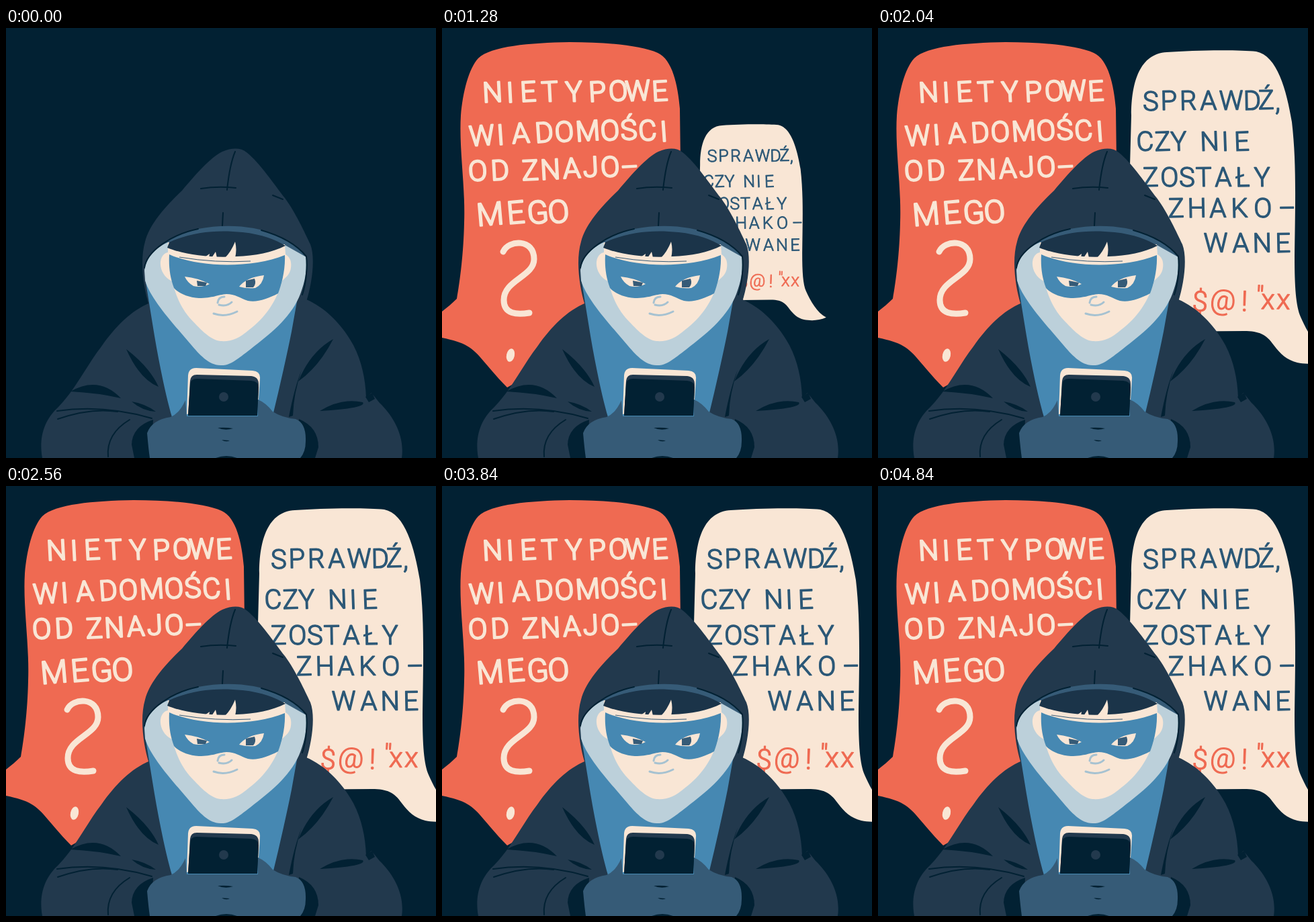
An HTML page for the animation above (4.88 s loop, 640 by 640 pixels).

```html
<!DOCTYPE html>
<html lang="pl">
<head>
<meta charset="utf-8">
<title>Nietypowe wiadomości</title>
<style>
  html, body { margin: 0; height: 100%; overflow: hidden; background: #022133; }
  svg { display: block; width: 100vw; height: 100vh; }
  text { font-family: Roboto, "Open Sans", sans-serif; font-weight: 300; font-stretch: 85%; text-anchor: middle; stroke-linejoin: round; white-space: pre; }
  .cream { fill: #f9e6d5; }
  .red { fill: #ef6a52; }
  .night { fill: #022133; }
  .jacket { fill: #22394d; }
  .steel { fill: #365b77; }
  .blue { fill: #4688b2; }
  .pale { fill: #bcd0da; }
  .line { fill: none; stroke: #022133; stroke-width: 2; stroke-linecap: round; stroke-linejoin: round; }
  .soft { fill: none; stroke: #a6c2d1; stroke-width: 3; stroke-linecap: round; }
  .ask text { fill: #f9e6d5; stroke: #f9e6d5; stroke-width: 2.4; font-size: 42px; }
  .tip text { fill: #2c5877; stroke: #2c5877; stroke-width: 1.5; font-size: 40px; }
  .tip .curse { fill: #ef6a52; stroke: #ef6a52; stroke-width: 1.2; font-size: 42px; }
</style>
</head>
<body>
<svg viewBox="0 0 640 640">
  <rect class="night" width="640" height="640"/>

  <g id="ask" class="ask">
    <path class="red" d="M28 130C31 95 40 60 54 45C73 27 130 22 190 21C245 21 296 26 321 37C343 47 351 85 354 120L355 200L340 400L250 450L97 535C85 523 74 510 62 496C45 475 34 468 0 461L-25 446C-14 431 6 419 22 403C27 375 32 335 33 290C35 235 25 180 28 130Z"/>
    <text x="76 102 129 161 197 232 263 292 325" y="111 111 110 110 110 110 109 109 109" rotate="-3">NIETYPOWE</text>
    <text x="60 88 118 153 183 218 251 279 307 331" y="176 174 172 171 170 169 168 167 168 169" rotate="-4">WIADOMOŚCI</text>
    <text x="54 87 110 132 162 194 222 251 280" y="228 227 227 227 226 224 222 222 222" rotate="-3">OD ZNAJO–</text>
    <text x="73 111 144 175" y="295 292 292 291" rotate="-5" style="font-size:47px">MEGO</text>
    <path d="M91 333C99 315 137 313 137 344C137 370 92 375 92 405C92 426 111 427 130 424" fill="none" stroke="#f9e6d5" stroke-width="9" stroke-linecap="round"/>
    <ellipse class="cream" cx="102" cy="487" rx="6" ry="10" transform="rotate(12 102 487)"/>
  </g>

  <g id="tip" class="tip">
    <path class="cream" d="M377 130C377 80 390 38 430 36C470 33 535 32 563 35C594 41 608 92 616 140C623 200 621 260 620 340C620 385 622 414 629 430C639 453 656 482 677 493C660 501 640 501 624 498C608 494 599 485 589 472C578 456 567 451 545 451L440 452L385 390L375 205Z"/>
    <text x="406 433 462 492 526 557 578 595" y="123 122 122 122 122 122 121 123" rotate="-1">SPRAWDŹ,</text>
    <text x="398 424 448 468 494 517 542" y="183" rotate="-2">CZY NIE</text>
    <text x="406 434 460 485 514 543 572" y="236" rotate="-1">ZOSTAŁY</text>
    <text x="444 475 506 538 573 609" y="282" rotate="-1">ZHAKO–</text>
    <text x="503 540 572 603" y="334" rotate="-1">WANE</text>
    <text class="curse" x="479 513 545 568 580 603" y="421 418 421 414 418 418" rotate="2">$@!"xx</text>
  </g>

  <g id="figure">
    <path class="jacket" d="M54 640C49 612 55 585 78 564C104 537 119 504 142 474C163 444 186 421 214 409L447 404C479 418 503 446 517 472C530 497 535 524 536 550L544 543L556 558C575 576 594 606 589 640Z"/>
    <path class="jacket" d="M213 413C204 385 199 345 207 318C214 290 242 261 262 242C283 217 304 193 322 184C337 178 349 178 358 185C379 202 399 233 415 253C430 273 445 305 453 322C461 343 455 382 447 407Z"/>

    <path class="blue" d="M207 372L218 440C226 490 237 545 247 579L396 581C406 540 417 492 425 452L435 396Z"/>
    <path class="steel" d="M206 354C211 329 247 307 286 299C326 291 371 294 402 308C425 318 438 328 447 341L445 370L208 372Z"/>
    <path class="pale" d="M206 361C209 341 222 327 241 319L415 323L447 341C449 360 444 382 436 401C421 434 392 456 364 478C343 494 333 503 319 502C302 502 287 485 276 472C249 440 216 405 207 376Z"/>
    <path class="cream" d="M241 319L415 322L416 337C424 342 425 349 424 357C423 366 416 372 411 376C403 407 385 432 362 449C346 463 335 467 319 466C304 465 286 445 273 431C258 413 253 397 247 377C235 371 229 359 230 348C231 339 236 335 241 334Z"/>
    <path fill="#1b3449" d="M243 319C277 303 315 300 352 304C381 307 401 315 416 324C397 334 370 339 343 340C306 343 264 337 240 327Z"/>
    <path class="cream" d="M326 342Q335 333 341 318Q344 330 341 342ZM306 342L312 333L314 342ZM296 341L303 336L302 342Z"/>
    <path d="M258 341Q312 350 364 347" fill="none" stroke="#365b77"/>
    <path class="blue" d="M243 337C287 357 365 358 415 338C416 360 410 382 405 395C390 403 373 409 360 406C348 402 341 396 328 396C315 397 308 402 287 402C270 401 256 394 250 387C244 371 242 355 243 337Z"/>
    <path class="cream" d="M266 370Q286 372 303 381Q291 387 279 384Q270 379 266 370ZM347 385Q358 371 384 368Q382 382 371 387Q357 388 347 385Z"/>
    <path class="steel" d="M284 376L299 379L297 384L285 384ZM357 376L370 373Q373 381 368 386L357 386Z"/>
    <path class="soft" d="M315 409Q316 400 325 400M317 412Q329 415 336 408M309 425Q326 431 344 422"/>

    <path class="line" d="M206 357C209 332 247 307 286 299M380 301Q426 314 447 340C449 359 446 382 441 397"/>
    <path class="line" d="M341 184Q333 203 329 241M290 239Q316 235 342 238M323 275L322 294M397 249L412 255"/>
    <path class="night" d="M179 478Q214 505 227 534Q199 523 179 478ZM96 541Q138 517 171 551Q136 543 96 541ZM187 556Q207 559 223 571Q203 570 187 556ZM487 463Q453 482 435 526Q466 504 487 463ZM440 509Q429 536 421 579L427 577Q428 544 440 509ZM467 570Q500 550 531 557Q538 566 467 570ZM535 549L545 543L549 552L540 557Z"/>
    <path class="line" d="M76 570Q146 560 217 581M77 582Q126 565 166 571M152 638Q149 604 184 583"/>

    <path class="night" d="M219 583Q188 593 187 620L191 640H216ZM436 582Q465 594 465 624L460 640H430Z"/>
    <path class="steel" d="M267 554Q258 574 245 579Q217 583 210 603Q212 626 214 640H438Q446 631 446 615Q447 588 431 582Q411 580 397 571Q387 558 375 553V578H269Z"/>
    <path class="cream" d="M269 575L271 517Q272 506 283 506L367 510Q379 511 378 522L376 553L285 570Z"/>
    <path class="jacket" d="M271 577L274 525Q275 516 284 516L365 518Q376 519 376 530L374 577Z"/>
    <path class="night" d="M271 577L274 530Q275 522 284 522L365 525Q376 526 376 535L374 577Z"/>
    <circle class="jacket" cx="324" cy="549" r="7"/>
    <path class="night" d="M315 595Q327 594 338 596Q326 600 315 595ZM321 613L333 614Q327 617 321 613ZM312 640Q328 634 344 640Z"/>
  </g>
</svg>
<script>
  const LOOP = 4880, STEP = 40, POP = 437;
  const bubbles = [
    { id: "ask", start: 29, x: 237, y: 290 },
    { id: "tip", start: 1206, x: 396, y: 327 }
  ].map(b => ({ ...b, node: document.getElementById(b.id) }));

  // Grows past full size, then settles back.
  function backOut(p) {
    if (p <= 0) return 0;
    if (p >= 1) return 1;
    const u = p - 1;
    return 1 + 2.70158 * u ** 3 + 1.70158 * u ** 2;
  }

  function draw(now) {
    const t = Math.floor((now % LOOP) / STEP) * STEP;
    for (const { node, start, x, y } of bubbles) {
      const s = backOut((t - start) / POP);
      node.style.display = s > 0 ? "" : "none";
      node.setAttribute("transform", `translate(${x} ${y}) scale(${s}) translate(${-x} ${-y})`);
    }
  }

  const begin = performance.now();
  function tick() {
    draw(performance.now() - begin);
    requestAnimationFrame(tick);
  }
  tick();
</script>
</body>
</html>
```
